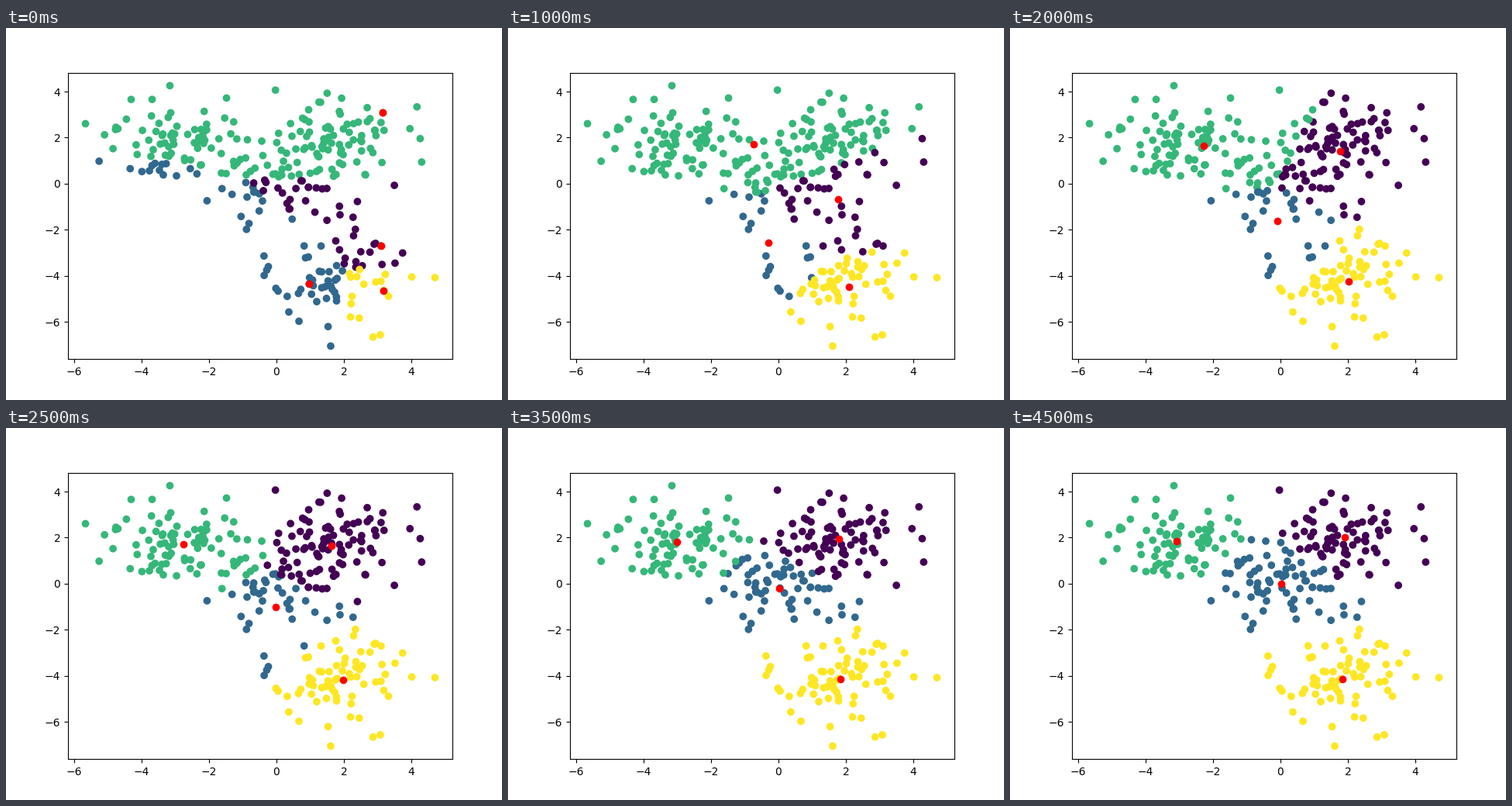
Animation of 640x480 px, one loop 5000 ms. Source, as a matplotlib script:

```python
import numpy as np
import matplotlib.pyplot as plt
from matplotlib.animation import FuncAnimation

STEPS = 10
INTERVAL = 500


def make_points():
    """Four shuffled Gaussian blobs of 75 points each."""
    rng = np.random.RandomState(0)
    blobs = [rng.normal(loc=c, scale=1.0, size=(75, 2))
             for c in [(0, 0), (2, 2), (-3, 2), (2, -4)]]
    points = np.concatenate(blobs)
    order = np.arange(len(points))
    rng.shuffle(order)
    return points[order]


def distances(points, centers):
    return np.linalg.norm(points[:, None] - centers[None], axis=2)


def assign(points, centers):
    return distances(points, centers).argmin(axis=1)


def means(points, labels, k):
    return np.array([points[labels == i].mean(axis=0) for i in range(k)])


def run_kmeans(points, guesses):
    """Return (labels, centers) for every step of Lloyd's algorithm."""
    centers = points[distances(points, guesses).argmin(axis=0)]
    labels = assign(points, centers)
    steps = [(labels, centers)]
    while len(steps) < STEPS:
        labels = assign(points, centers)
        centers = means(points, labels, len(guesses))
        steps.append((labels, centers))
    return steps


points = make_points()
guesses = np.array([(3.11, -2.70), (0.98, -4.36), (3.16, 3.08), (3.19, -4.65)])
steps = run_kmeans(points, guesses)

fig, ax = plt.subplots(figsize=(6.4, 4.8), dpi=100)
dots = ax.scatter(*points.T, c=steps[0][0], cmap="viridis", vmin=0, vmax=3)
marks = ax.scatter(*steps[0][1].T, c="r")


def update(i):
    labels, centers = steps[i]
    dots.set_array(labels)
    marks.set_offsets(centers)
    return dots, marks


anim = FuncAnimation(fig, update, frames=STEPS, interval=INTERVAL,
                     init_func=lambda: update(0), repeat=True, repeat_delay=0)
plt.show()
```
